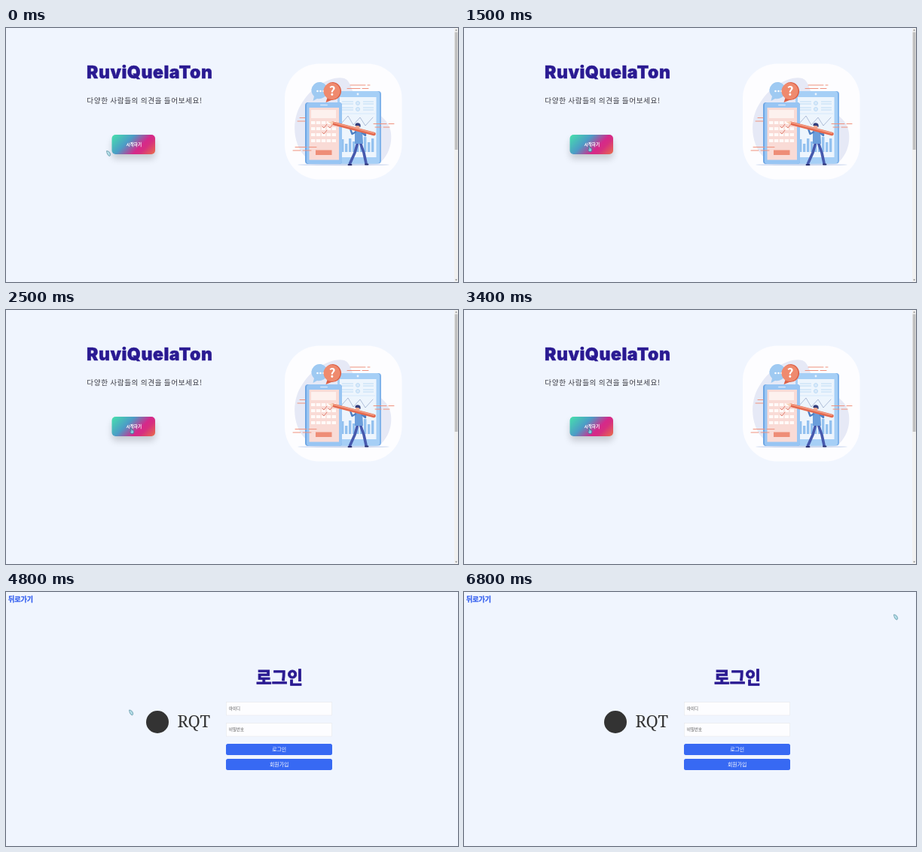
Recreate the animation shown at these times as an HTML page. Size 600 px wide and 338 px high, loop 6.9 s.

```html
<!DOCTYPE html>
<html>
<head>
<meta charset="utf-8">
<title>Survey site</title>
<style>
html, body { margin: 0; width: 100%; height: 100%; overflow: hidden; background: #f0f5fe; }
svg { display: block; width: 600px; height: 338px; font-family: "Noto Sans CJK KR", "Noto Sans CJK", sans-serif; }
.mid { text-anchor: middle; }
.brand { font: 900 23px Inter, sans-serif; letter-spacing: .55px; fill: #2a1a92; stroke: #2a1a92; stroke-width: .4px; }
.small { font-size: 5.4px; fill: #555; }
.field { fill: #fdfdff; stroke: #e6e8ec; stroke-width: .6px; }
.btn { fill: #3769f3; }
.label { fill: #fff; font-size: 6.9px; text-anchor: middle; }
.round { stroke-linecap: round; stroke-linejoin: round; fill: none; }
</style>
</head>
<body>
<svg viewBox="0 0 600 338">
  <defs>
    <linearGradient id="hot" gradientUnits="userSpaceOnUse" x1="148.5" y1="134" x2="190.5" y2="176">
      <stop offset="0" stop-color="#46e2ac"/>
      <stop offset=".36" stop-color="#4c9cc6"/>
      <stop offset=".64" stop-color="#d6288a"/>
      <stop offset=".74" stop-color="#d62f80"/>
      <stop offset="1" stop-color="#ea7048"/>
    </linearGradient>
    <filter id="blur" x="-50%" y="-80%" width="200%" height="260%"><feGaussianBlur stdDeviation="5"/></filter>
  </defs>

  <g id="home">
    <text class="brand" x="107" y="67.3">RuviQuelaTon</text>
    <text x="107.300" y="100.400" font-size="9.600" letter-spacing=".6" fill="#3a3a42">다양한 사람들의 의견을 들어보세요!</text>

    <rect x="141" y="148" width="57" height="26" rx="5" fill="#000" opacity=".18" filter="url(#blur)"/>
    <rect x="140.5" y="142" width="57.5" height="26" rx="5" fill="url(#hot)"/>
    <text class="mid" x="169.800" y="156.800" font-size="5.600" font-weight="700" fill="#fff">시작하기</text>

    <rect x="370" y="47.5" width="155.5" height="154" rx="46" fill="#fdfdff"/>
    <path fill="#e6e9f6" d="M398 172C380 155 378 120 394 98C408 76 434 63 449 67C460 71 457 88 470 98C482 110 508 115 511 140C513 158 505 172 496 180H402Z"/>
    <ellipse cx="448" cy="182" rx="61" ry="1.2" fill="#ccd8ef"/>

    <rect x="440" y="84" width="58" height="96.5" rx="4" fill="#7fb2ea"/>
    <rect x="440" y="84" width="56" height="96.5" rx="4" fill="#a6cff6"/>
    <rect x="443" y="92" width="48.500" height="80" fill="#edf5fd"/>
    <circle cx="467" cy="88" r="1.4" fill="#edf5fd"/>
    <g stroke="#b9d8f4" stroke-width=".9">
      <path d="M446 98H461M446 101H461M446 106H461M446 109H461M474 98H488M474 101H488M474 106H488M474 109H488"/>
      <g fill="#d9eafa"><circle cx="467" cy="100" r="2.5"/><circle cx="467" cy="108" r="2.5"/></g>
      <path d="M445 114H490" stroke-width=".5"/>
    </g>
    <path class="round" stroke="#8498bf" stroke-width=".6" d="M446 126L454 117L461 129L470 119L477 130L487 119"/>
    <g id="bars" fill="#93c1ef"></g>

    <rect x="397" y="99" width="49" height="82" rx="4" fill="#6ea6e4"/>
    <rect x="399" y="99" width="47" height="82" rx="4" fill="#98c5f3"/>
    <rect x="402.500" y="106" width="39.500" height="69.500" fill="#f9dbd6"/>
    <rect x="417" y="101.800" width="10" height="1.500" rx=".7" fill="#d4e7fb"/>
    <rect x="405" y="109" width="33" height="11" fill="#fdf1ee"/>
    <g id="boxes" fill="#fffaf8"></g>
    <path class="round" stroke="#dd7363" stroke-width=".9" d="M420 131l2 2 4-5M420 139l2 2 4-5M428 131l2 2 4-5"/>
    <rect x="411" y="162.500" width="21.500" height="6.500" fill="#ee8d77"/>

    <path fill="#9fcaf2" d="M418 72A11 11 0 1 1 413 94L407.500 97L409 91A11 11 0 0 1 418 72Z"/>
    <g fill="#fff"><circle cx="413.500" cy="84" r="1.3"/><circle cx="417.500" cy="84" r="1.3"/><circle cx="421.500" cy="84" r="1.3"/></g>
    <path fill="#dc6148" d="M434 72A12 12 0 1 1 432 96L424.500 99L426.500 93A12 12 0 0 1 434 72Z"/>
    <circle cx="432.500" cy="84" r="11" fill="#ef8a6e"/>
    <text class="mid" x="433" y="90.300" font-size="17" font-weight="900" fill="#fff">?</text>

    <path class="round" stroke="#ef917d" stroke-width="1" d="M457 76H477M480 76H483M453 80.500H470M473 80.500H481M488 127.500H505M508 127.500H515M490 132H498M501 132H509M390 119.500H397M387 124H397M384 158.500H399M402 158.500H412M381 163H391M394 163H405"/>

    <path class="round" stroke="#4659ae" stroke-width="3.600" d="M467 152L463 166L456.500 180.500M470 152L475 166L478 180"/>
    <path class="round" stroke="#2b3274" stroke-width="1.800" d="M454.500 182H458.500M477 181.500H480.500"/>
    <path fill="#6b9edb" d="M463 136Q468 133.500 473 136L474 154H463Z"/>
    <path class="round" stroke="#4d7fc4" stroke-width="2.400" d="M464 138.500L459.500 141L457.500 135.500M472.500 139L477 143L477 140"/>
    <path class="round" stroke="#e4694f" stroke-width="4.600" stroke-linecap="butt" d="M434 126.700L488.500 141"/>
    <path stroke="#f5a086" stroke-width="1.500" d="M434.300 125.800L488.700 140"/>
    <path fill="#f8d2b8" d="M427 124.600L434.500 124.400L433.500 129Z"/>
    <circle cx="467" cy="130.500" r="3" fill="#f0ad94"/>
    <path fill="#343f7c" d="M463.500 130Q463 126.500 467 126.300Q471.500 126.500 470.500 132L468 130Z"/>

    <rect x="595" width="5" height="338" fill="#f1f1f1"/>
    <rect x="595.700" y="5.500" width="3.800" height="156.500" fill="#c0c0c0"/>
    <path fill="#777" d="M596.200 3.500L597.600 1.700L599 3.500ZM596.200 334.500L597.600 336.300L599 334.500Z"/>
  </g>

  <g id="login">
    <text x="3" y="13" font-size="9" font-weight="900" fill="#3a64f0" stroke="#3a64f0" stroke-width=".3">뒤로가기</text>
    <text class="mid" x="363" y="122" font-size="22.5" font-weight="900" fill="#2a1a92" stroke="#2a1a92" stroke-width=".8">로그인</text>
    <circle cx="201" cy="173" r="15" fill="#333"/>
    <text x="227.500" y="179.700" font-size="22" fill="#333" style="font-family:'Noto Serif',serif">RQT</text>
    <rect class="field" x="292.500" y="146.500" width="140" height="17.500"/>
    <rect class="field" x="292.500" y="174.500" width="140" height="17.500"/>
    <text class="small" x="296" y="157">아이디</text>
    <text class="small" x="296" y="185.200">비밀번호</text>
    <rect class="btn" x="292" y="202" width="141" height="15" rx="2.500"/>
    <rect class="btn" x="292" y="222" width="141" height="15" rx="2.500"/>
    <text class="label" x="362.700" y="212.200">로그인</text>
    <text class="label" x="362.700" y="232.200">회원가입</text>
  </g>

  <g id="cursor">
    <g id="leaf">
      <path fill="#9dd0dd" stroke="#6b98a8" stroke-width=".7" d="M-2.500 -3.500Q1.500 -3.500 2.700 1Q3 3 1.500 3.500Q-2 2.500 -2.500 -3.500Z"/>
      <path stroke="#e4f5f8" stroke-width=".8" d="M-1.300 -2L1.200 1.500"/>
    </g>
    <path id="hand" fill="#86c8dc" stroke="#38708f" stroke-width=".7" d="M-1.500 -3.500Q-.6 -4.200 -.3 -3L0 -1L2 -.5Q3 0 2.700 2L2 4H-1L-2.700 1.200Q-2.500 .3 -1.200 1Z"/>
  </g>
</svg>
<script>
const $ = id => document.getElementById(id);
const LOOP = 6900, STEP = 100, CUT = 3500;

const rect = (x, y, w, h) => `<rect x="${x}" y="${y}" width="${w}" height="${h}"/>`;
$('bars').innerHTML = [17, 11, 18, 14, 9, 16, 20, 13, 18]
  .map((h, i) => rect(445 + i * 5, 165 - h, 3.4, h)).join('');
let cells = '';
for (let row = 0; row < 4; row++)
  for (let col = 0; col < 5; col++) cells += rect(405 + col * 6.9, 124 + row * 8, 5.4, 4);
$('boxes').innerHTML = cells;

// time, x, y
const path = [
  [0, 136, 167], [600, 167, 160.5], [3400, 167, 160.5], [3500, 166, 160.5],
  [5700, 166, 160.5], [6400, 578, 30.5], [6500, 585, 30.5], [6800, 573, 33.5]
];
const ease = k => k * k * (3 - 2 * k);

function place(t) {
  let i = 0;
  while (i < path.length - 2 && t >= path[i + 1][0]) i++;
  const [t0, x0, y0] = path[i], [t1, x1, y1] = path[i + 1];
  const k = ease(Math.min(1, (t - t0) / (t1 - t0)));
  return [x0 + (x1 - x0) * k, y0 + (y1 - y0) * k];
}

const show = (id, on) => { $(id).style.display = on ? '' : 'none'; };

function draw(now) {
  const t = Math.floor(now % LOOP / STEP) * STEP;
  const home = t < CUT;
  const [x, y] = place(t);
  const hover = home && x > 141 && x < 198 && y < 168;
  show('home', home);
  show('login', !home);
  show('hand', hover);
  show('leaf', !hover);
  $('cursor').setAttribute('transform', `translate(${x} ${y})`);
}

const start = performance.now();
function tick() {
  draw(performance.now() - start);
  requestAnimationFrame(tick);
}
tick();
</script>
</body>
</html>
```
